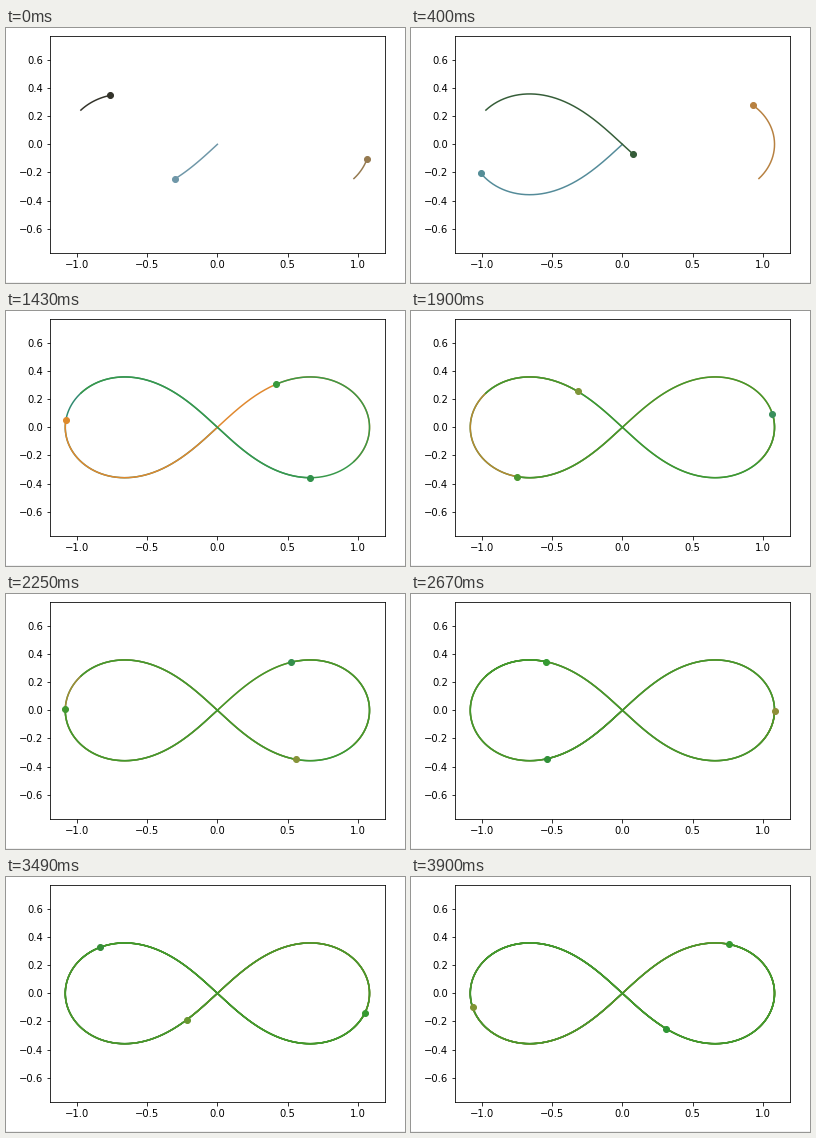
A matplotlib script that plays this animation: 399x255 px, repeating every 3970 ms.

```python
import numpy as np
import matplotlib.pyplot as plt
from matplotlib.animation import FuncAnimation
from matplotlib.colors import to_rgb

W, H, DPI = 399, 255, 72
LOOP, TICK = 3970, 10      # ms
DT = 0.0025

plt.rcParams["font.family"] = "DejaVu Sans"


def accel(pos):
    """Gravity among three unit masses."""
    acc = np.zeros_like(pos)
    for i, j in ((0, 1), (0, 2), (1, 2)):
        d = pos[j] - pos[i]
        pull = d / (d @ d) ** 1.5
        acc[i] += pull
        acc[j] -= pull
    return acc


def orbit(count):
    """Figure-eight three-body orbit by velocity Verlet."""
    start = np.array([0.97000436, -0.24308753])
    speed = np.array([-0.93240737, -0.86473146])
    pos = np.array([[0.0, 0.0], start, -start])
    vel = np.array([speed, -speed / 2, -speed / 2])
    acc = accel(pos)
    path = [pos]
    for _ in range(count):
        vel = vel + acc * DT / 2
        pos = pos + vel * DT
        acc = accel(pos)
        vel = vel + acc * DT / 2
        path.append(pos)
    return np.array(path)


path = orbit(4000)

# Steps last 70 ms, a few only 60 ms
holds = np.full(58, 70)
holds[[3, 6, 12, 18, 23, 24, 47, 51, 54]] = 60
starts = np.concatenate(([0], np.cumsum(holds)[:-1]))

# Clock in ms against orbit time
KEYS = [0, 820, 1430, 1900, 2670, 3160, 3900]
TIMES = [0.31, 2.306, 3.80, 4.948, 6.851, 8.0, 9.806]

DOTS = [
    "#6f97a8 #2f7f80 #30904a #3a8f5c #2f9038 #388a3c #2f9634",
    "#957a50 #ea8a2a #de8a2c #7f9638 #8f8f38 #5a982c #7f9434",
    "#33332a #38954c #389a3c #4a982f #359a32 #359a32 #359a30",
]
TRAILS = [
    "#6f97a8 #2f7a84 #2f8a70 #3a8f5c #3a9050 #3a9050 #3a9050",
    "#957a50 #e88a2c #e0882e #b58a30 #8f8f34 #8f8f34 #8f8f34",
    "#33332a #38994c #38994a #40992e #43982c #43982c #43982c",
]


def ramp(text):
    return np.array([to_rgb(c) for c in text.split()])


def shade(table, ms):
    return [np.interp(ms, KEYS, table[:, k]) for k in range(3)]


dot_ramps = [ramp(s) for s in DOTS]
trail_ramps = [ramp(s) for s in TRAILS]

fig = plt.figure(figsize=((W + 1e-6) / DPI, (H + 1e-6) / DPI), dpi=DPI,
                 facecolor="white")
AW, AH = 334.8, 217.44
ax = fig.add_axes([44 / W, 1 - (7.6 + AH) / H, AW / W, AH / H])
xmax = 1.1895
ax.set_xlim(-xmax, xmax)
ax.set_ylim(-xmax * AH / AW, xmax * AH / AW)
ax.set_xticks(np.linspace(-1, 1, 5))
ax.set_yticks(np.linspace(-0.6, 0.6, 7).round(1))
fig.add_artist(plt.Rectangle((0, 0), 1, 1 / H, fc="#f0f0f0", ec="none"))

trails = [ax.plot([], [], lw=1.5, zorder=2)[0] for _ in range(3)]
dots = [ax.plot([], [], "o", ms=6, zorder=3)[0] for _ in range(3)]


def draw(frame):
    step = np.searchsorted(starts, frame * TICK, side="right") - 1
    ms = starts[step]
    n = int(round(np.interp(ms, KEYS, TIMES) / DT))
    for b in range(3):
        x, y = path[:n + 1, b].T
        trails[b].set_data(x, y)
        trails[b].set_color(shade(trail_ramps[b], ms))
        dots[b].set_data(x[-1:], y[-1:])
        dots[b].set_color(shade(dot_ramps[b], ms))
    return trails + dots


anim = FuncAnimation(fig, draw, frames=LOOP // TICK, interval=TICK,
                     init_func=lambda: draw(0), repeat=True, repeat_delay=0)
plt.show()
```
